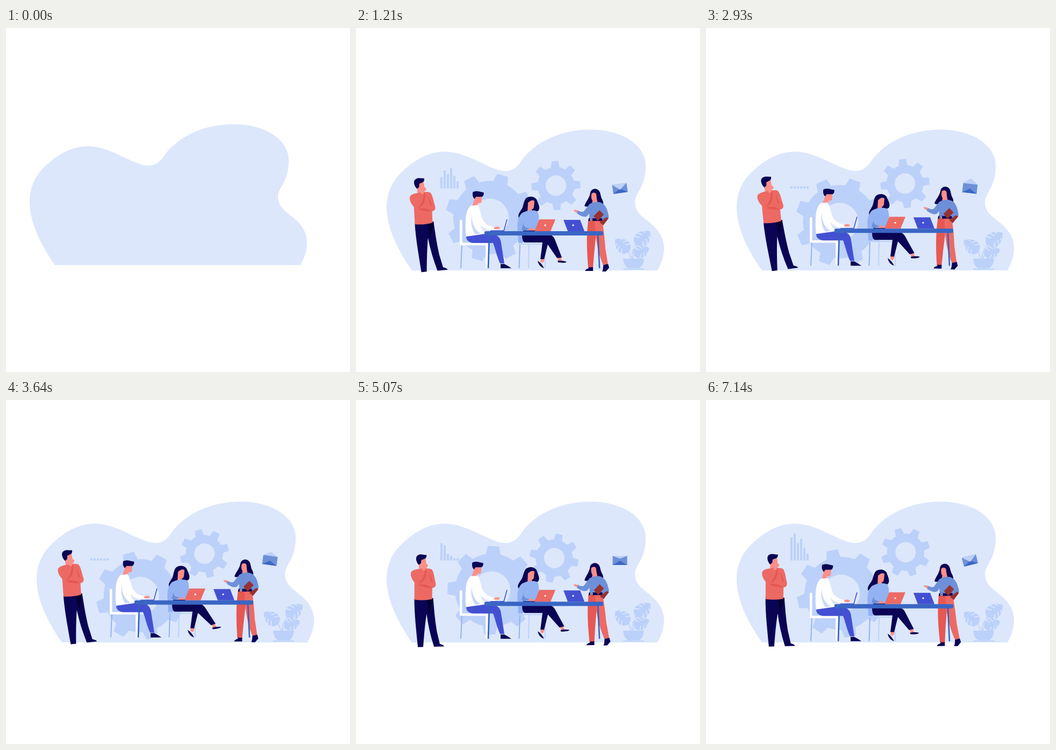
Recreate the animation shown at these times as an HTML page. Size 640 by 640 pixels, loop 7.21 s.

```html
<!DOCTYPE html>
<html lang="en">
<head>
<meta charset="utf-8">
<title>Office meeting</title>
<style>
html, body { margin: 0; height: 100%; overflow: hidden; background: #fff; }
svg { display: block; width: 100%; height: 100%; }
.pale { fill: #bcd1f9; }
.coral { fill: #ed6a64; }
.rust { fill: #e65852; }
.skin { fill: #fc8f88; }
.navy { fill: #0a0454; }
.indigo { fill: #4450d2; }
.sky { fill: #92b2f2; }
.steel { fill: #6d90d8; }
.book { fill: #963232; }
.white { fill: #fff; }
.line { fill: none; }
</style>
</head>
<body>
<svg viewBox="0 0 640 640">
<defs>
  <g id="leaf">
    <path class="pale" d="M0 0C2-15 20-15 30 0C20 15 2 15 0 0Z"/>
    <path class="line" stroke="#dce7fc" stroke-width="1.5" d="M5-13L12-4M13-13L18-4M21-11L23-4M5 13L12 4M13 13L18 4M21 11L23 4"/>
  </g>
</defs>
<path id="blob" fill="#dce7fc" d="M91 441C65 404 44 362 44 323C44 295 56 273 72 258C97 234 124 220 152 220C196 220 236 256 265 256C276 256 285 251 292 241C318 201 370 179 424 179C482 179 526 208 526 246C526 262 523 276 516 289C509 301 506 307 506 314C506 334 522 342 536 354C551 367 560 381 560 400C560 414 555 428 548 441Z"/>
<g id="scene">
  <path id="bars" class="pale"/>
  <g id="bigGear"></g>
  <g id="smallGear"></g>

  <g id="leftLeaves">
    <path class="line" stroke="#bcd1f9" stroke-width="1.5" d="M511 430Q511 420 503 411"/>
    <use href="#leaf" transform="translate(508 416)rotate(-138)scale(1.15 1.15)"/>
  </g>
  <g id="rightLeaves">
    <path class="line" stroke="#bcd1f9" stroke-width="1.5" d="M513 430Q513 412 524 399M515 430Q516 420 524 417"/>
    <use href="#leaf" transform="translate(520 403)rotate(-42)scale(1.23)"/>
    <use href="#leaf" transform="translate(517 422)rotate(-24)scale(1.04)"/>
  </g>
  <path class="pale" d="M497 429H536Q535 442 527 447H506Q498 442 497 429ZM497 447.6H536V449.4H497Z"/>

  <g id="envelope">
    <path id="flapOpen" class="pale"/>
    <path class="steel" d="M-13.5-8.5h27v17h-27z"/>
    <path fill="#3b67c5" d="M-13.5 8.5L0 .5L13.5 8.5Z"/>
    <path id="flapShut" class="pale"/>
  </g>

  <g id="standingMan">
    <path class="navy" d="M111 371H146C147 390 148 410 151 432L156 456Q163 458 164 461H145C139 440 135 420 133 400C130 415 127 440 125 461H115C113 430 110 400 111 371Z"/>
    <path fill="#040030" d="M134 373H146L137 402Z"/>
    <path class="skin" d="M124 301L134 296L135 306L133 314L130 314V320H121V306Z"/>
    <path class="navy" d="M121 309C115 302 115 293 120 291C125 288 130 291 136 291Q136 297 132 298L126 300L125 306Z"/>
    <path class="coral" d="M112 318C120 316 138 314 145 318C149 324 149 332 151 341C153 349 150 352 145 352L144 373Q128 376 111 373L112 341C106 334 104 325 107 321Q109 319 112 318Z"/>
    <path class="rust" d="M119 346Q130 342 145 352Q130 352 119 346ZM135 318Q136 334 125 342L119 344Q131 334 132 318ZM140 323L142 340L146 342Z"/>
    <path class="skin" d="M127 318Q128 310 134 307Q140 308 137 313Q133 315 132 320Z"/>
  </g>

  <g id="standingWoman">
    <path class="navy" d="M436 306C438 299 446 298 450 301C456 305 454 312 458 319C462 327 460 331 455 333L440 326C434 334 427 333 425 331C428 322 434 318 436 306Z"/>
    <path class="skin" d="M438 309C441 305 445 306 447 309L448 318L450 327L439 326L440 321Q437 318 438 309Z"/>
    <path class="coral" d="M432 358H458C461 375 463 395 464 410L469 441H460C453 425 449 408 446 388Z"/>
    <path class="rust" d="M432 358H444L446 390L443 420L441 446H432C430 420 428 390 432 358Z"/>
    <path class="navy" d="M433 445H441V452H426Q428 448 433 447ZM460 441L469 439L471 446L465 453H458Q460 449 460 441Z"/>
    <path class="steel" d="M434 328C441 323 452 322 458 326C466 331 468 340 470 349Q471 354 465 360L455 357L434 356V345L430 350Q424 354 411 345L412 339Q420 344 424 341Z"/>
    <path class="skin" d="M404 339Q408 337 413 340L411 344Q407 342 404 339Z"/>
    <path class="navy" d="M433 354H458V359H432Z"/>
    <path class="line" stroke="#fff" d="M436 355h3v3h-3z"/>
    <path class="book" d="M442 350L453 339L461 347L450 359ZM453 361L466 352L470 354L460 367Z"/>
  </g>

  <g id="desk">
    <path class="line" stroke="#92b2f2" stroke-width="2" d="M197 403L195 447M305 401L303.500 447"/>
    <path class="line" stroke="#bcd1f9" stroke-width="2" d="M322 401L321 447M351 401L352 447M302 402H353"/>
    <path class="line" stroke="#fff" stroke-width="4.500" d="M195.200 357V402H243.500V447"/>

    <path class="indigo" d="M205 388C212 382 235 379 245 381L262 386Q269 390 270 400L276 438H268C262 425 259 410 255 400H218Q205 398 205 388Z"/>
    <path class="navy" d="M269 439H276Q284 443 289 447H269Z"/>
    <g id="manHead">
      <path class="skin" d="M223 313L235 311L234 324Q232 327 227 326L228 333H216L221 318Z"/>
      <path class="navy" d="M218 305Q224 302 233 305L238 306Q239 311 235 314L224 314L221 318C217 314 217 309 218 305Z"/>
    </g>
    <path class="white" d="M214 330C204 338 203 355 204 380L205 388L240 383C238 378 232 374 232 366C238 374 250 377 259 377V371C248 369 238 364 234 352C231 340 229 332 226 329Q220 331 214 330Z"/>
    <path fill="#c8d9fb" d="M216 347C214 360 220 376 232 382L222 384C214 372 213 358 216 347Z"/>
    <path class="skin" d="M257 371Q263 368 268 371L266 374H257Z"/>

    <path id="womanHair" class="navy" d="M316 317C322 312 332 313 336 319C339 327 343 333 340 339C337 343 330 341 326 343C318 347 308 348 303 354C301 348 303 345 307 339C312 333 311 323 316 317Z"/>
    <path class="skin" d="M320 325Q328 318 332 322L331 333Q329 338 327 337L328 343H319Z"/>
    <path class="sky" d="M308 345C318 338 334 338 338 342C341 350 341 358 338 366L334 378L318 382L310 400H302L301 378C299 365 301 352 308 345Z"/>
    <path class="steel" d="M313 359Q308 372 325 373L313 377L308 375Z"/>
    <path class="skin" d="M321 373Q328 371 333 375L331 377H322ZM344 429L351 430L348 437L343 435Z"/>
    <path class="navy" d="M309 385H362L357 402L350 430H343L347 399H314Q309 398 309 385ZM338 433Q345 437 350 447Q340 444 338 433Z"/>
    <g id="shin">
      <path class="skin" d="M375 427L381 425L383 434L377 435Z"/>
      <path class="navy" d="M350 385H362Q368 387 371 396L383 427L374 428L352 396ZM375 433Q384 432 392 435Q390 438 376 436Z"/>
    </g>

    <path class="line" stroke="#4450d2" stroke-width="1.600" d="M281 356L275 377.500H250"/>
    <path class="coral" d="M341 356H371L362 378H332Z"/>
    <path class="indigo" d="M386 357H417L425 378H394Z"/>
    <path class="navy" d="M311 377H333V379H311Z"/>
    <circle class="white" cx="352" cy="367" r="1.600"/>
    <circle class="white" cx="404" cy="367" r="1.600"/>
    <rect x="239" y="378" width="221" height="8" rx="3" fill="#3a66c4"/>
    <path class="line" stroke="#3460bc" stroke-width="2.600" d="M248 385L246 447M450 385L453 447"/>
  </g>
</g>
</svg>
<script>
const LOOP = 7210, FPS = 14, PERIOD = 100 / FPS;
const barHeights = [43, 50, 32, 40, 23, 13];
const legKeys = [[0, -6], [1.2, 0], [2.2, 0], [3.4, -12], [4.3, -12], [5.7, -4], [7.3, -6]];
const flapKeys = [[0, -1], [1.3, -1], [2.1, 1], [2.6, 1], [4.29, .55], [5.6, -1], [7.3, -1]];
const leafKeys = [[0, 1], [.9, 0], [1.64, 0], [2.9, 1], [3.4, 1], [5, 0], [5.5, .2], [6.4, 1], [8, 1]];

const $ = id => document.getElementById(id);
const move = (id, transform) => $(id).setAttribute('transform', transform);
const draw = (id, d) => $(id).setAttribute('d', d);
const smooth = u => (u = Math.min(1, Math.max(0, u)), u * u * (3 - 2 * u));
const wave = (t, peak = 0, cycles = 1) => Math.cos(2 * Math.PI * cycles * (t - peak) / PERIOD);

function track(keys, t) {
  const i = keys.findIndex(key => key[0] > t);
  const [t0, a] = keys[i - 1], [t1, b] = keys[i];
  return a + (b - a) * smooth((t - t0) / (t1 - t0));
}

function buildGear(id, outer, body, hole, tip, base) {
  let teeth = '';
  for (let a = 0; a < 360; a += 45)
    teeth += `<path class="pale" transform="rotate(${a})" d="M${-base} ${3 - body}L${-tip} ${-outer}H${tip}L${base} ${3 - body}Z"/>`;
  $(id).innerHTML = `${teeth}<circle class="line" r="${(body + hole) / 2}" stroke="#bcd1f9" stroke-width="${body - hole}"/>`;
}

function render(ms) {
  const frame = Math.floor((ms + 9.9) * FPS / 1000), t = frame / FPS;
  const started = frame > 1;
  $('scene').style.display = started ? '' : 'none';
  move('blob', started ? 'translate(13 10)' : '');
  if (!started) return;

  draw('bars', barHeights.map((h, i) => {
    const level = 1 - smooth((t - .4 - i * .2) / 1.6) + smooth((t - 4 - i * .2) / 1.6);
    return `M${157 + i * 6} 298.5v${-Math.max(4, h * level)}h4V298.5Z`;
  }).join(''));

  // Both gears bob and spin around a slightly off-centre axle.
  const spin = 360 * t / PERIOD, bob = wave(t, 0, 2);
  move('bigGear', `translate(250.5 ${357 + 5 * bob})rotate(${-spin})translate(.85 -2.1)rotate(-12)`);
  move('smallGear', `translate(370.3 ${290 - 5.5 * bob})rotate(${spin})translate(1.07 -1.3)rotate(-18.5)`);

  move('leftLeaves', `rotate(${-4 * track(leafKeys, t)} 512 430)`);
  move('rightLeaves', `rotate(${5 * track(leafKeys, t)} 515 430)`);

  const float = wave(t), flap = track(flapKeys, t);
  const flapPath = `M-13.5-8.5H13.5L0 ${-8.5 - 11 * flap}Z`;
  move('envelope', `translate(491 298.5)rotate(${-3 - 11 * float})`);
  draw('flapOpen', flap > 0 ? flapPath : '');
  draw('flapShut', flap > 0 ? '' : flapPath);

  const rise = wave(t, 6) - 1, lean = wave(t, 6.15) - 1, drift = 1.3 * wave(t, .8) - .7;
  move('standingMan', `translate(${133 + drift} ${395 + 6.4 * rise})rotate(${3.8 * lean})scale(1 ${1 - .014 * lean})translate(-133 -395)`);

  const sway = wave(t, 6.3) + .23;
  move('standingWoman', `translate(0 ${5.6 * sway})rotate(${-1.7 * sway} 445 330)`);
  move('desk', `translate(0 ${3.5 * float - 1.8})`);
  move('manHead', `translate(${-.5 - 1.4 * sway} 0)`);
  move('womanHair', `rotate(${2.5 * sway} 326 320)`);
  move('shin', `rotate(${track(legKeys, t)} 360 391)`);
}

buildGear('bigGear', 82, 68, 35, 10.5, 14);
buildGear('smallGear', 45.5, 34.5, 19, 6.3, 8.3);

const start = performance.now();
function tick() {
  render((performance.now() - start) % LOOP);
  requestAnimationFrame(tick);
}
tick();
</script>
</body>
</html>
```
